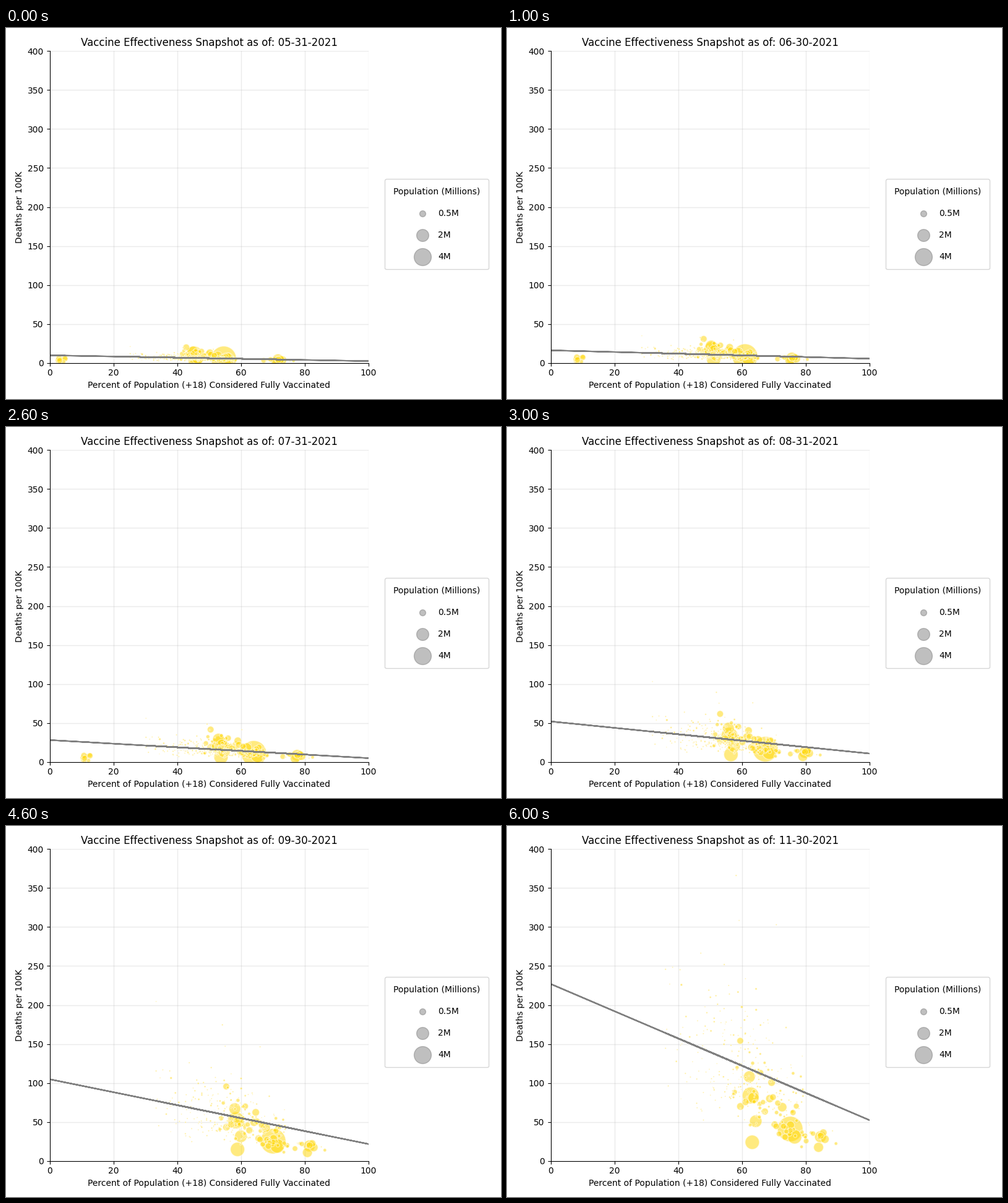
These frames come from a looping animation (800x600 px, 7000 ms). A matplotlib script:

```python
import numpy as np
import matplotlib.pyplot as plt
from matplotlib.animation import FuncAnimation

DPI = 100
DATES = ["05-31", "06-30", "07-31", "08-31", "09-30", "10-31", "11-30"]

# Trend line heights at 0 and 100 percent, month by month.
LEFT = [9.8, 16.2, 28.1, 52, 104.8, 167.4, 227]
RIGHT = [2.4, 5.5, 4.9, 10.8, 21.7, 35.7, 52.3]

# Share of the total rise in vaccinations and deaths reached each month.
RISE = [0, .31, .46, .62, .755, .885, 1]
SHARE = [.13, .2, .27, .4, .62, .82, 1]

# Biggest counties: radius in px, final percent, final deaths.
BIG = [
    (20, 75.1, 41), (13, 62.7, 84), (11, 63.2, 24), (11, 76.5, 31),
    (9.5, 64.3, 51), (9, 62.3, 108), (9, 84.6, 31), (8.5, 63.6, 81),
    (7.5, 84, 17.5), (7, 72.6, 69), (6.3, 86, 28), (6, 68.7, 80),
    (6, 75.2, 46), (5.5, 59.5, 70),
]
N_MID, N_CROWD, N_LOW = 48, 260, 10

rng = np.random.default_rng(21)


def trend(x, month):
    return LEFT[month] + (RIGHT[month] - LEFT[month]) * x / 100


def noise(spread, n):
    return np.exp(rng.normal(0, spread, n))


# Mid-sized counties: the more vaccinated, the fewer deaths.
mid_x = np.clip(rng.normal(72, 8, N_MID), 57, 90)
mid_r = 2.2 + 3.4 * rng.random(N_MID) ** 2
mid_y = np.clip(239 - 2.48 * mid_x, 15, None) * noise(.3, N_MID)
main_r, main_x, main_y = np.hstack([np.array(BIG).T, (mid_r, mid_x, mid_y)])

# Rural crowd, scattered around the trend line.
crowd_r = np.clip(.6 * noise(.55, N_CROWD), .15, 2.2)
crowd_x = np.clip(rng.normal(57, 10, N_CROWD) + 3 * crowd_r, 36, 92)
crowd_ratio = .88 * noise(.38, N_CROWD)

# Counties with barely any recorded doses until August.
low_r = rng.uniform(2.4, 5, N_LOW)
low_x = rng.uniform(2.5, 5, N_LOW)
low_y = rng.uniform(1, 6, N_LOW)


def percent(final, month):
    gain = np.where(final > 80, 13, 13 + .25 * (final - 45))
    return final - gain * (1 - RISE[month])


def counties(month):
    x = percent(crowd_x, month)
    groups = [
        (main_r, percent(main_x, month), main_y * SHARE[month]),
        (crowd_r, x, trend(x, month) * crowd_ratio),
    ]
    if month < 3:
        groups.append((low_r, low_x + 17 * RISE[month],
                       low_y * (1 + RISE[month])))
    return np.hstack(groups)


plt.rcParams["path.simplify"] = False
fig, ax = plt.subplots(figsize=(8, 6), dpi=DPI)
ax.set(xlim=(0, 100), ylim=(0, 400),
       xlabel="Percent of Population (+18) Considered Fully Vaccinated",
       ylabel="Deaths per 100K")
ax.spines[["top", "right"]].set_visible(False)
ax.set_axisbelow(True)
ax.grid(alpha=.25, lw=1)

dots = ax.scatter([], [], color="gold", edgecolors="white",
                  linewidths=1, alpha=.5)
line, = ax.plot([], [], color="gray", lw=1.5)

for millions in (.5, 2, 4):
    ax.scatter([], [], s=100 * millions, c="gray", alpha=.5,
               label=f"{millions:g}M")
ax.legend(title="Population (Millions)", loc=(1.05, .3),
          labelspacing=1.5, borderpad=1)


def update(month):
    r, x, y = counties(month)
    dots.set_offsets(np.column_stack([x, y]))
    dots.set_sizes((2 * (r + .5) * 72 / DPI) ** 2)
    # Running back and forth through the counties hardens the line's edge.
    path = np.concatenate([[0, 100], x, [0, 100]])
    line.set_data(path, trend(path, month))
    ax.set_title(f"Vaccine Effectiveness Snapshot as of: {DATES[month]}-2021")
    return dots, line


update(0)
fig.tight_layout()
anim = FuncAnimation(fig, update, frames=len(DATES), interval=1000,
                     repeat=True, repeat_delay=0)
plt.show()
```
